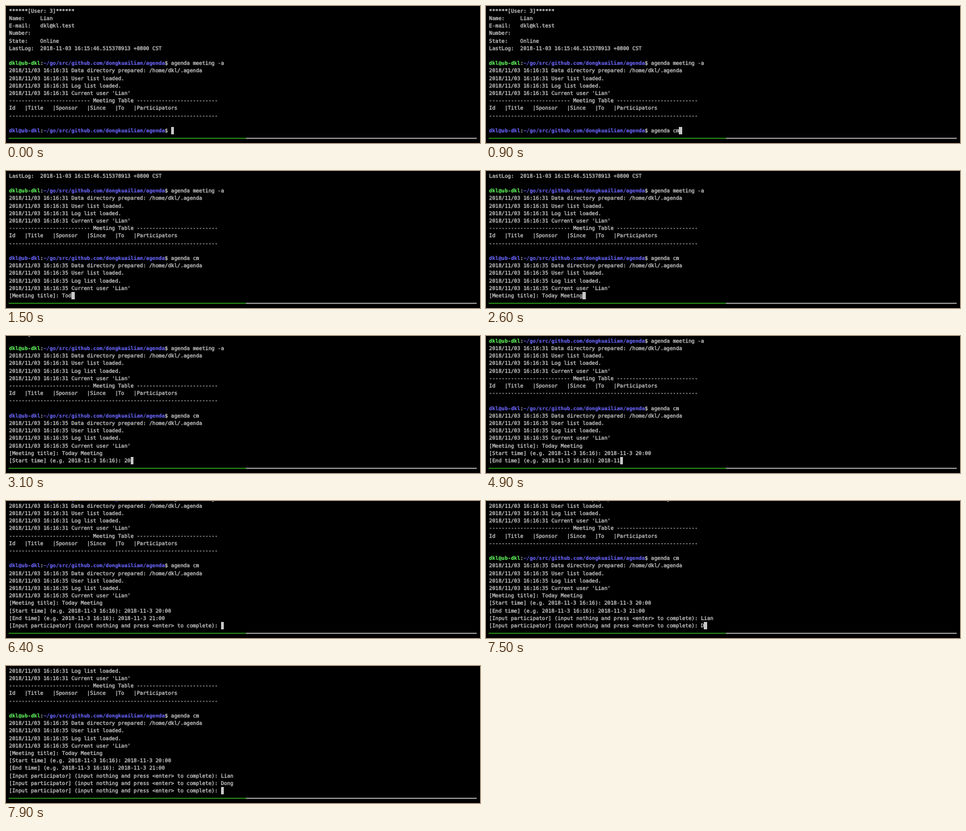
An HTML page for the animation above (8000 ms loop, 703x205 px).

```html
<!DOCTYPE html>
<html lang="en">
<head>
<meta charset="utf-8">
<title>Terminal session</title>
<style>
html, body { margin: 0; width: 100%; height: 100%; overflow: hidden; background: #000; }
pre {
  position: absolute; left: 4.6px; top: -9.4px; margin: 0;
  font: 7.68px/11.2px "DejaVu Sans Mono", monospace;
  text-rendering: geometricPrecision;
  color: #c7c7c7; -webkit-text-stroke: .3px;
}
b { color: #62f65f; -webkit-text-stroke: .1px; }
b + b { color: #6a66fb; }
i { display: inline-block; width: 1ch; height: 11.2px; vertical-align: top; background: #c7c7c7; }
#bar {
  position: absolute; left: 4px; top: 197px; width: 694px; height: 2px;
  background: linear-gradient(90deg, #227414 352px, #8a8a8a 352px);
}
</style>
</head>
<body>
<pre id="term"></pre>
<div id="bar"></div>
<script>
const LOOP = 8000, ROWS = 18; // the top row is almost scrolled out
const term = document.getElementById('term');
const user = 'dkl@ub-dkl', path = '~/go/src/github.com/dongkuailian/agenda';
const prompt = `${user}:${path}$ `;
const dashes = '-'.repeat(26);
const eg = '(e.g. 2018-11-3 16:16): ';
const ask = '\n[Input participator] (input nothing and press <enter> to complete): ';

const log = sec => ['Data directory prepared: /home/dkl/.agenda', 'User list loaded.',
  'Log list loaded.', "Current user 'Lian'"].map(s => `2018/11/03 16:16:${sec} ${s}\n`).join('');

const opening = `
******[User: 3]******
Name:     Lian
E-mail:   dkl@kl.test
Number:
State:    Online
LastLog:  2018-11-03 16:15:46.515378913 +0800 CST

${prompt}agenda meeting -a
${log(31)}${dashes} Meeting Table ${dashes}
Id   |Title   |Sponsor   |Since   |To   |Participators
${'-'.repeat(67)}

${prompt}`;

// [start ms, ms per key (0 = printed at once), text]; \b erases one character
const script = [
  [0, 0, opening],
  [100, 100, 'agenda cm'],
  [1200, 0, `\n${log(35)}[Meeting title]: `],
  [1300, 100, 'Today Meeting'],
  [2700, 0, `\n[Start time] ${eg}`],
  [3000, 100, '2018-11-3 1'],
  [4050, 50, '\b20:00'],
  [4400, 0, `\n[End time] ${eg}`],
  [4500, 66, '2018-11'],
  [5000, 57, '-3 21:00'],
  [5700, 0, ask],
  [6500, 100, 'Lian'],
  [7000, 0, ask],
  [7500, 100, 'Dong'],
  [7900, 0, ask]
];

function screenAt(t) {
  let text = '';
  for (const [start, step, s] of script) {
    if (t < start) break;
    text += step ? s.slice(0, Math.floor((t - start) / step) + 1) : s;
  }
  return text.replace(/.\x08/g, '').split('\n').slice(-ROWS).join('\n');
}

const toHtml = text => text.replace(/</g, '&lt;')
  .replaceAll(`${user}:${path}`, `<b>${user}</b>:<b>${path}</b>`) + '<i></i>';

// A leading newline is kept because innerHTML on an existing pre does not drop it
let shown;
function draw() {
  const text = screenAt(performance.now() % LOOP);
  if (text !== shown) term.innerHTML = toHtml(shown = text);
  requestAnimationFrame(draw);
}
draw();
</script>
</body>
</html>
```
